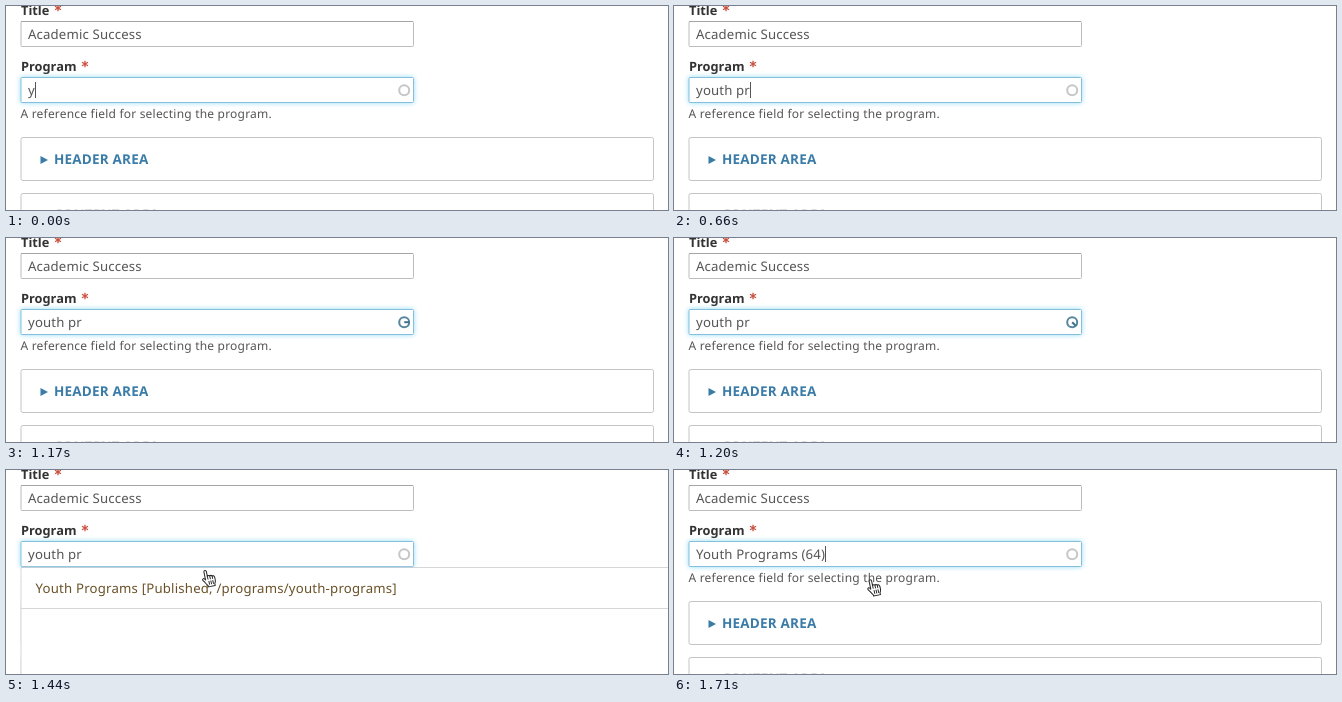
These frames come from a looping animation (662x204 px, 1.8 s). An HTML page:

```html
<!DOCTYPE html>
<html lang="en">
<head>
<meta charset="utf-8">
<title>Autocomplete field</title>
<style>
  html, body { margin: 0; width: 100%; height: 100%; overflow: hidden; background: #fff; }
  svg { display: block; width: 662px; height: 204px; }
  text {
    font: 13.2px "Noto Sans", "Open Sans", sans-serif;
    letter-spacing: .15px;
    white-space: pre;
    text-rendering: geometricPrecision;
    fill: #555;
  }
  .label { font-weight: 700; font-size: 12.8px; letter-spacing: 0; fill: #333; }
  .hint { font-size: 12px; letter-spacing: .2px; }
  .legend { font-weight: 700; font-size: 13.5px; letter-spacing: .2px; fill: #3a7ba8; }
  .box { fill: #fff; stroke: #c4c4c4; }
  .field { fill: #fff; stroke: #bcbcbc; }
  .focus { stroke: #86bfdc; filter: drop-shadow(0 0 2.5px #92dcf8); }
  .star { stroke: #c9503f; stroke-width: 1.3; }
  .line { fill: none; stroke: #d6d6d6; }
  #link { fill: #27708f; letter-spacing: .2px; }
  #link.hover { fill: #6a5228; }
  #link.under { text-decoration: underline; }
  .ring { fill: none; stroke: #c6c6c6; stroke-width: 2; }
  .busy .ring { stroke: #56869f; }
  #hand { fill: #fff; stroke: #222; stroke-linejoin: round; stroke-linecap: round; }
  #beam { fill: none; stroke: #222; stroke-width: 1.2; }
</style>
</head>
<body>
<svg viewBox="0 0 662 204">
  <defs>
    <path id="star" class="star" d="M0-3.3V3.3M-3-1.7 3 1.7M-3 1.7 3-1.7"/>
  </defs>

  <text class="label" x="15" y="9">Title</text>
  <use href="#star" x="52" y="2"/>
  <rect class="field" x="15" y="15.5" width="392.5" height="25" rx="1"/>
  <path d="M15 15.5H407" stroke="#a6a6a6"/>
  <text x="22" y="33">Academic Success</text>

  <text class="label" x="15" y="65">Program</text>
  <use href="#star" x="79" y="58"/>
  <rect class="field focus" x="15" y="71.5" width="392.5" height="25" rx="1"/>
  <text id="typed" x="22" y="89"></text>
  <path id="caret" d="M.5 76V92" stroke="#555"/>
  <g id="throbber" transform="translate(398.2 84.2)">
    <circle class="ring" r="5"/>
    <path id="spoke" d="M0 0H5" stroke="#3f718c" stroke-width="2"/>
  </g>
  <text class="hint" x="14.5" y="112">A reference field for selecting the program.</text>

  <rect class="box" x="15" y="131.5" width="632.5" height="43" rx="2"/>
  <path d="M34.5 150V158L42 154Z" fill="#3a7ba8"/>
  <text class="legend" x="48" y="158">HEADER AREA</text>
  <rect class="box" x="15" y="187.5" width="632.5" height="43" rx="2"/>
  <text class="legend" x="48" y="213.4" style="fill:#ccc">CONTENT AREA</text>

  <g id="menu">
    <path d="M14.5 97H662V204H14.5Z" fill="#fff"/>
    <path class="line" d="M15 204V97.5H662M15 138.5H662"/>
    <path d="M15 97H407" stroke="#a8cde0"/>
    <text id="link" y="123">Youth Programs [Published, /programs/youth-programs]</text>
  </g>

  <g id="mouse">
    <path id="beam" d="M-3.5-7.2Q-.5-7.2 0-5.5Q.5-7.2 3.5-7.2M0-5.5V5.5M-3.5 7.2Q-.5 7.2 0 5.5Q.5 7.2 3.5 7.2M-2 2.5H2"/>
    <g id="hand" transform="rotate(-12)">
      <path d="M-3.5 1V-7Q-3.5-8.4-2.2-8.4Q-1-8.4-1-7V-2.4Q.2-3.4 1.4-2.2Q2.7-3 3.7-1.6Q5.6-2.2 6 .2V3Q6 4.6 4.8 6.4V8.3H-2.2V7Q-3.4 5.6-4.6 3.3L-6.3.8Q-6.6-.6-5.3-.8Q-4.4-.8-3.5 1Z"/>
      <path d="M-1-2.4V.6M1.4-2.2V.8M3.7-1.6V1M-.5 3V6M1.5 3V6M3.5 3V6" fill="none" stroke-width=".9"/>
    </g>
  </g>
</svg>
<script>
  const LOOP = 1800, TICK = 30;
  const PHRASE = "youth pr";
  const KEY_TIMES = [0, 30, 180, 270, 360, 480, 570, 660];
  const BUSY = [960, 1260], MENU = [1260, 1710], BLINK = [1140, 1620];
  // time, x, y
  const TRACK = [
    [1290, 208.3, 82.5], [1320, 207.5, 90], [1380, 205, 100],
    [1440, 202.8, 108.3], [1530, 200.5, 115.3], [1620, 200, 117.5]
  ];

  const $ = id => document.getElementById(id);
  const [typed, caret, throbber, spoke, menu, link, mouse, beam, hand] =
    ["typed", "caret", "throbber", "spoke", "menu", "link", "mouse", "beam", "hand"].map($);
  const within = (t, [from, to]) => t >= from && t < to;
  const show = (el, on) => { el.style.display = on ? "" : "none"; };

  function pointAt(t) {
    const i = TRACK.findIndex(p => p[0] > t);
    if (i < 0) return TRACK[TRACK.length - 1].slice(1);
    if (i === 0) return null;
    const [t0, x0, y0] = TRACK[i - 1], [t1, x1, y1] = TRACK[i];
    const k = (t - t0) / (t1 - t0);
    return [x0 + (x1 - x0) * k, y0 + (y1 - y0) * k];
  }

  function draw(t) {
    const value = t >= MENU[1]
      ? "Youth Programs (64)"
      : PHRASE.slice(0, KEY_TIMES.filter(k => k <= t).length);
    if (typed.textContent !== value) typed.textContent = value;
    const end = Math.round(22 + typed.getComputedTextLength());
    caret.setAttribute("transform", `translate(${end} 0)`);
    show(caret, !within(t, BLINK));

    const busy = within(t, BUSY);
    throbber.classList.toggle("busy", busy);
    show(spoke, busy);
    spoke.setAttribute("transform", `rotate(${(t - 1170) / TICK * 45})`);

    const at = pointAt(t);
    const y = at ? at[1] : 0;
    show(mouse, at);
    if (at) mouse.setAttribute("transform", `translate(${at})`);
    show(beam, y < 97);
    show(hand, y >= 97);

    show(menu, within(t, MENU));
    link.setAttribute("x", y >= 97 ? 29.5 : 30.5);
    link.classList.toggle("hover", y >= 97);
    link.classList.toggle("under", y > 112);
  }

  function frame() {
    const t = performance.now() % LOOP;
    draw(Math.floor(t / TICK) * TICK);
    requestAnimationFrame(frame);
  }
  frame();
</script>
</body>
</html>
```
